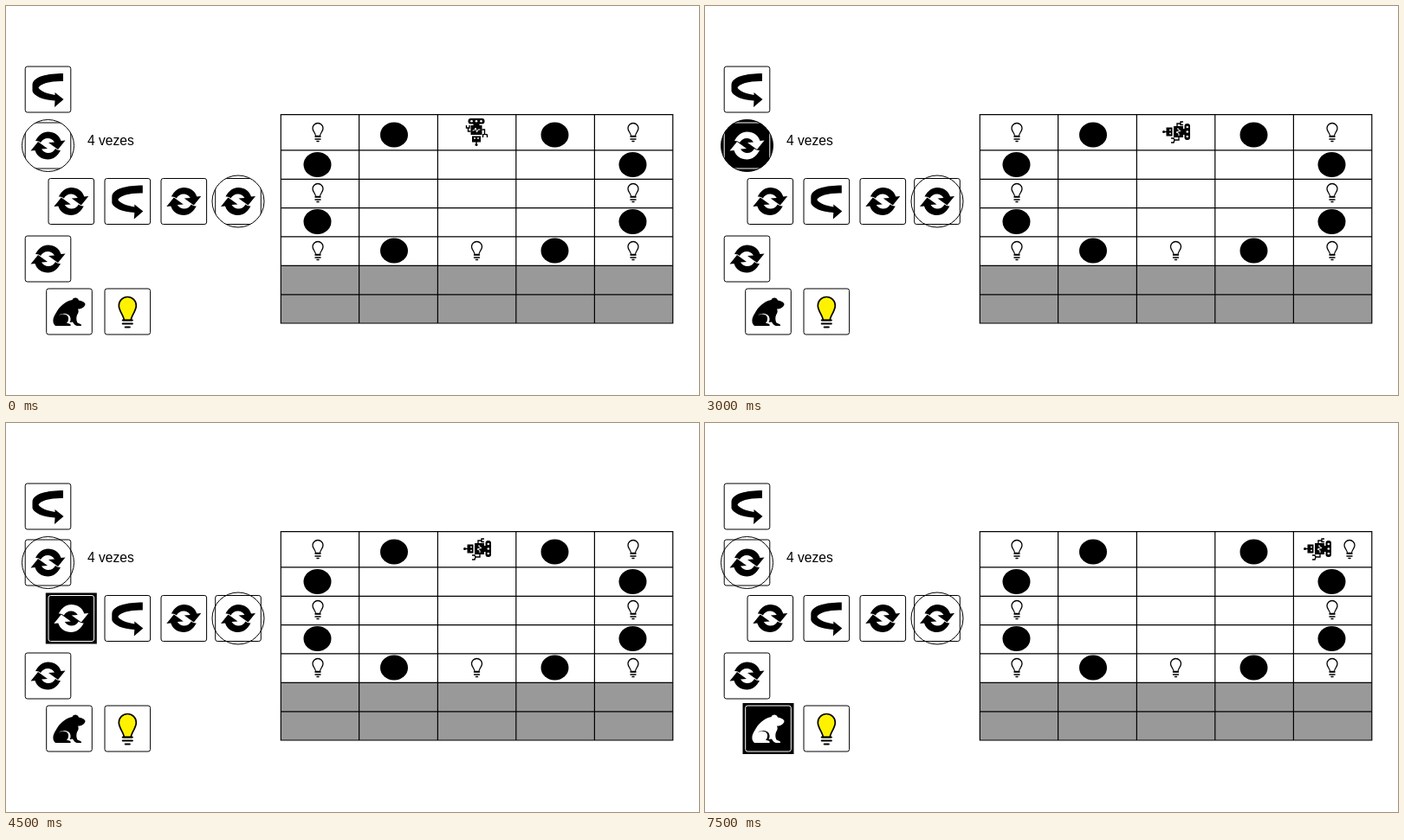
An HTML page for the animation above (8 s loop, 800 by 450 pixels).

```html
<!DOCTYPE html>
<html lang="pt">
<head>
<meta charset="utf-8">
<style>
  html, body { margin: 0; width: 100%; height: 100%; overflow: hidden; background: #fff; }
  svg { display: block; width: 100%; height: 100%; }
  text { font: 15.6px "Liberation Sans", Arial, sans-serif; }
</style>
</head>
<body>
<svg id="stage" viewBox="0 0 800 450">
  <defs>
    <clipPath id="disc"><circle r="30"/></clipPath>

    <path id="turn" d="M17.5-18.5C0-18.5-18-15-18-5V2C-16 8-6 12 8 13L7.500 20.500L18 11.500L8 3.500V6.500C-1 5-9 2-11-2C-9-7 4-10 17.500-9.500Z"/>

    <g id="half">
      <path d="M-14.500-5.500C-11-12-6-16 0-16C7-16 13-12 15-5.500L20-6L11.500 4.500L.5-3.500L7.500-4C5-7.500 2.500-8.500 0-8.500C-4-8.500-7-6.500-8.500-3.500Q-11-6-14.500-5.500Z"/>
    </g>
    <g id="cycle"><use href="#half"/><use href="#half" transform="rotate(180)"/></g>

    <path id="frog" d="M18.500-8.500C18-11 14-12.500 11-13C10-16.500 5-17 3.500-13.500C-5-12-12-5-15.500 2C-19 7-20 13-16 16.500H1.500C2.500 14.500 0 13.500-3 13.500C0 10 0 5-4 3.500C-7 2.500-10 3-12 4.500C-8 1-1 2 1 6C2 9 1.500 11 .5 12.500L4 12C5 14 7 16.500 9 16.500H14C14.500 14 11 14 9.500 13C8 10 8 7 9 4C11 1 11-1 10-3C14-3 18-5 18.500-8.500Z"/>

    <g id="lamp">
      <path d="M-4 10C-4 5-10-.5-10-7A10 10 0 0 1 10-7C10-.5 4 5 4 10Z" fill="#fff200" stroke="#000" stroke-width="1.700"/>
      <path d="M-5.500 10H5.500M-5.500 14H5.500M-2.500 18H2.500" stroke="#000" stroke-width="2.200" stroke-linecap="round"/>
    </g>

    <g id="bulb" fill="none" stroke="#000" stroke-linecap="round">
      <path d="M-2.500 4.500C-2.500 1-6-1-6-4.500A6 6 0 0 1 6-4.500C6-1 2.500 1 2.500 4.500Z" stroke-width="1.300"/>
      <path d="M-3 5H3M-3 8H3M-1 10.500H1" stroke-width="1.500"/>
    </g>

    <g id="robot">
      <rect x="-10" y="-16" width="19" height="6.500" rx="3"/>
      <path d="M-4-10H3V-8H-4ZM-7-8H6V3H-7ZM-5.500 4.500H4.500V11.500H-5.500ZM-1.200 11H.2V15H-1.200Z"/>
      <circle cx="-.5" cy="14.500" r="1.500"/>
      <path d="M-7-1H-10V-5M-12-8V-5H-8.500V-8M6-3H9V2M7 6V3L9 2L12 3V6" fill="none" stroke="#000" stroke-width="1.400"/>
      <g fill="#fff"><circle cx="-6" cy="-12.800" r="1.300"/><circle cx="-.5" cy="-12.800" r="1.300"/><circle cx="5" cy="-12.800" r="1.300"/><circle cx="-2.500" cy="7" r=".9"/><circle cx="1.500" cy="7" r=".9"/></g>
      <path d="M-5-2H-3L-1.500-5L0 0L1.500-3H4" fill="none" stroke="#fff"/>
    </g>
  </defs>
  <g id="board"></g>
  <g id="scene"></g>
</svg>
<script>
const board = document.getElementById('board');
const scene = document.getElementById('scene');
const STEP = 1500, LOOP = 8000;
const columns = [317.3, 407.6, 498.4, 588.8, 679.4, 769.8];
const rows = [125.6, 166.8, 200.4, 233.7, 266.8, 300.4, 333.8, 367];

// Tile centres in program order
const tiles = [
  ['turn', 48.5, 96.5], ['cycle', 48.5, 161.5, true],
  ['cycle', 75.3, 226], ['turn', 140.3, 226], ['cycle', 205.3, 226], ['cycle', 268, 226, true],
  ['cycle', 48.5, 292.5], ['frog', 73, 353.5], ['lamp', 140.3, 353.5]
];

const steps = [
  { active: -1, robot: [543.5, 146, 0], clipped: [1, 5] },
  { active: 0 },
  { active: 1, clipped: [1] },
  { active: 2 },
  { active: 6, labels: true },
  { active: 7, robot: [707, 146, 90], corner: 744 }
];

const place = (id, x, y, turn = 0) =>
  `<use href="#${id}" transform="translate(${x} ${y}) rotate(${turn})"/>`;
const text = (x, y, words) => `<text x="${x}" y="${y}">${words}</text>`;

function tile([icon, x, y, ringed], active, clipped) {
  const ink = active ? '#fff' : '#000', paper = active ? '#000' : '#fff';
  const backing = !active ? '' : ringed ? '<circle r="30"/>'
    : '<rect x="-29.5" y="-29.5" width="59" height="59"/>';
  return `<g transform="translate(${x} ${y})">${backing}
    <g fill="${ink}" ${clipped ? 'clip-path="url(#disc)"' : ''}>
      <rect x="-26.300" y="-26.500" width="52.600" height="53" rx="2.500" fill="${paper}" stroke="${ink}"/>
      <use href="#${icon}"/>
    </g>
    ${ringed ? '<circle r="30" fill="none" stroke="#000"/>' : ''}</g>`;
}

function drawBoard() {
  const lines = columns.map(x => `M${x} 125V367.500`).concat(rows.map(y => `M317 ${y}H770`)).join('');
  const dots = [[448, 149], [633.5, 149], [359.5, 183.5], [723.5, 183.5],
    [359.5, 249.5], [723.5, 249.5], [448, 283], [633.5, 283]];
  const bulbs = [[360, 146], [360, 216], [724, 216], [360, 283], [543.5, 283], [724, 283]];
  board.innerHTML = '<rect x="317" y="300" width="453" height="67" fill="#999"/>' +
    `<path d="${lines}" stroke="#000" stroke-width="1.200"/>` +
    dots.map(([x, y]) => `<ellipse cx="${x}" cy="${y}" rx="16" ry="14.500"/>`).join('') +
    bulbs.map(([x, y]) => place('bulb', x, y)).join('');
}

function drawStep({ active, robot = [544, 146, 90], clipped = [], labels, corner = 724 }) {
  scene.innerHTML =
    tiles.map((item, i) => tile(item, i === active, clipped.includes(i))).join('') +
    text(94, 161, labels ? 'Repetição 1' : '4 vezes') +
    (labels ? text(87.5, 302, 'Repetição 2') : '') +
    place('bulb', corner, 146) + place('robot', ...robot);
}

let shown = -1;
function tick() {
  const step = Math.floor(performance.now() % LOOP / STEP);
  if (step !== shown) drawStep(steps[shown = step]);
  requestAnimationFrame(tick);
}

drawBoard();
tick();
</script>
</body>
</html>
```
